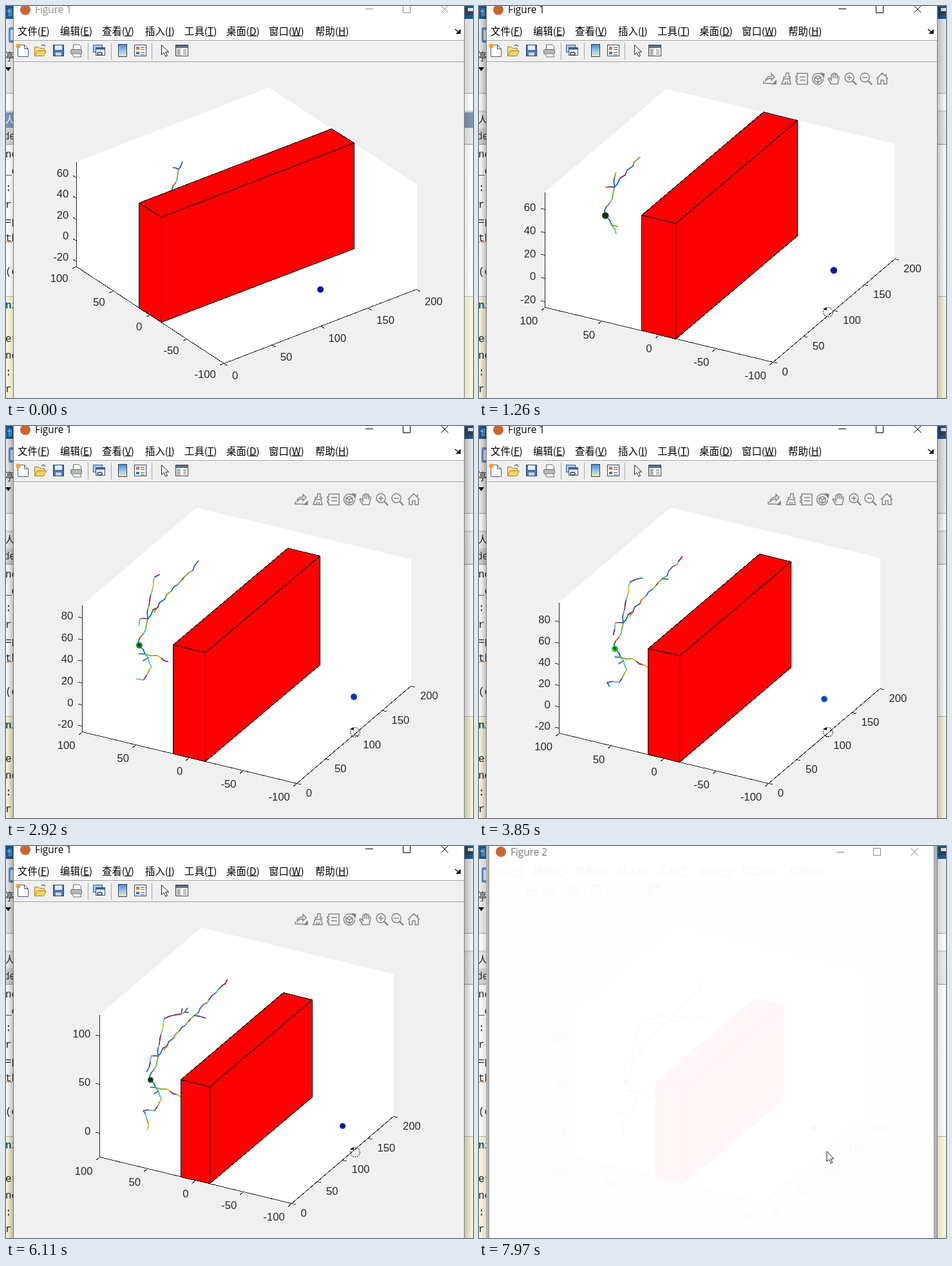
Write an HTML page that moves like this. It is 725 by 608 pixels and loops after 8 s.

```html
<!DOCTYPE html>
<html lang="zh">
<head>
<meta charset="utf-8">
<title>Path search</title>
<style>
html, body { margin: 0; width: 100%; height: 100%; overflow: hidden; background: #f0f0f0; }
svg { display: block; width: 725px; height: 608px; }
.ui { font: 15.4px "Noto Sans CJK SC", "Noto Sans CJK", "Noto Sans", sans-serif; }
.title { font: 15.4px "Open Sans", "Noto Sans", sans-serif; }
.code { font: 16px "Liberation Mono", monospace; fill: #222; }
.bold { font-weight: 700; fill: #165a6a; }
.axis { font: 16.67px "Liberation Sans", Arial, sans-serif; fill: #262626; }
.crisp { shape-rendering: crispEdges; }
</style>
</head>
<body>
<svg id="stage" viewBox="0 0 725 608" xmlns="http://www.w3.org/2000/svg">
  <defs>
    <linearGradient id="shadeL"><stop stop-color="#000" stop-opacity="0"/><stop offset="1" stop-color="#000" stop-opacity=".24"/></linearGradient>
    <linearGradient id="shadeR"><stop stop-color="#000" stop-opacity=".24"/><stop offset="1" stop-color="#000" stop-opacity="0"/></linearGradient>
    <linearGradient id="bar" x2="0" y2="1"><stop stop-color="#4d86c8"/><stop offset=".6" stop-color="#9fd0ee"/><stop offset="1" stop-color="#fbe9a0"/></linearGradient>
  </defs>
  <g id="desk"></g>
  <g id="shade"><path fill="url(#shadeL)" d="M0 0h11v608H0z"/><path fill="url(#shadeR)" d="M711 0h14v608h-14z"/></g>
  <path fill="#f0f0f0" d="M11 0h700v608H11z"/>
  <path fill="#fff" d="M11 0h700v53H11z"/>
  <path stroke="#a0a0a0" d="M11 53.5h700M11 86.5h700"/>
  <path stroke="#fafafa" d="M11 54.5h700M11 87.5h700"/>
  <path stroke="#7c7c7c" d="M11.5 0v608M711.5 0v608"/>
  <circle cx="30" cy="6" r="8" fill="#c9662f"/>
  <g id="caption">
    <text class="title" x="45" y="11">Figure 1</text>
    <path fill="none" stroke="currentColor" d="M558 4.5h12M616.5 -1.5h11v12h-11zM675.5 -.5l11 11M686.5 -.5l-11 11"/>
  </g>
  <g id="menu" class="ui" fill="#000"></g>
  <path d="M697 36l5 4M705 37.5v5h-5z" stroke="#111" stroke-width="1.6" fill="#111"/>
  <g id="tools"></g>
  <g id="plot"></g>
  <g id="hover" fill="none" stroke="#858585" stroke-width="1.5"></g>
  <g id="pointer">
    <circle id="glow" cx="-3" cy="-1" r="15" fill="#fbfb6c"/>
    <circle r="7.3" fill="none" stroke="#111" stroke-width="1.1" stroke-dasharray="1.8 1.5"/>
    <path d="M-8 -5l6 -3v5z" fill="#111"/>
  </g>
  <g id="second">
    <path fill="#b4b4b4" d="M11 0h5v608h-5zM706 0h5v608h-5z"/>
    <path fill="#fff" d="M16 0h690v608H16z"/>
    <path stroke="#8f8f8f" d="M15.5 0v608M706.5 0v608"/>
    <circle cx="34" cy="9" r="8" fill="#c9662f"/>
    <text class="title" x="49" y="15" fill="#777">Figure 2</text>
    <path fill="none" stroke="#858585" d="M555 9.5h12M612.5 3.5h11v11h-11zM670.5 3.5l11 11M681.5 3.5l-11 11"/>
  </g>
  <path id="arrow" d="M540 473.5v16l3.7 -3.4 2.6 6 2.4 -1.1 -2.6 -5.8h4.6z" fill="#fff" stroke="#222"/>
</svg>
<script>
const LOOP = 8000;
const $ = id => document.getElementById(id);
const rect = (x, y, w, h, fill, more = '') => `<rect x="${x}" y="${y}" width="${w}" height="${h}" fill="${fill}" ${more}/>`;
const path = (d, more = '') => `<path d="${d}" ${more}/>`;
const clamp = v => Math.min(1, Math.max(0, v));
const mix = (a, b, p) => a + (b - a) * p;
const blendRgb = (a, b, p) => `rgb(${a.map((v, i) => Math.round(mix(v, b[i], p)))})`;

// Linear interpolation over [time, value] pairs.
function track(t, keys) {
  let v = keys[0][1];
  for (let i = 1; i < keys.length; i++) {
    const [t0] = keys[i - 1], [t1, b] = keys[i];
    v = mix(v, b, clamp((t - t0) / (t1 - t0)));
  }
  return v;
}

function buildDesk() {
  const strip = (y, h, fill, id = '') => rect(0, y, 725, h, fill, id && `id="${id}"`);
  const code = 'nc _c :( r: =p th . (o . ni . er nc :( r:'.split(' ');
  $('desk').innerHTML =
    strip(0, 608, '#fff') + strip(0, 20, '#145c9c') + strip(20, 116, '#ececec') + strip(135, 1, '#a6a6a6') +
    strip(162, 3, '#dcdcdc') + strip(165, 24, '#7c96b4', 'tab') + strip(189, 25, '#ececec') +
    rect(0, 190, 12, 24, '#d6d6d6') +
    strip(214, 1, '#9a9a9a') + strip(451, 157, '#fcfadc') + strip(450, 1, '#b8b8b8') +
    rect(4, 33, 12, 24, '#5f93c6', 'rx="3"') + rect(7, 37, 8, 16, '#d9e9f7') +
    rect(714, 2, 14, 12, '#39424d') + rect(717, 3, 8, 5, '#dfe6ee') +
    path('M2 8h5M5 4v12M8 4v12', 'stroke="#d6e7f5" fill="none"') +
    '<text class="ui" x="-4" y="84" fill="#222">停</text>' + path('M-1 95h9l-4.5 6z') +
    '<text id="tabText" class="ui" x="-2" y="182">人</text><text class="title" x="-4" y="207" fill="#333">de</text>' +
    code.map((s, i) => s === '.' ? '' :
      `<text class="code${s === 'ni' ? ' bold' : ''}" x="-1" y="${235 + 26 * i}">${s}</text>`).join('') +
    path('M0 367l2 -2 2 2 2 -2 2 2 2 -2', 'stroke="#e07020" fill="none"');
}

function buildMenu() {
  const items = [['文件', 'F', 18], ['编辑', 'E', 84], ['查看', 'V', 149], ['插入', 'I', 216],
    ['工具', 'T', 277], ['桌面', 'D', 342], ['窗口', 'W', 408], ['帮助', 'H', 480]];
  $('menu').innerHTML = items.map(([s, k, x]) =>
    `<text x="${x}" y="44.5">${s}(<tspan text-decoration="underline">${k}</tspan>)</text>`).join('');
}

function buildTools() {
  const line = 'stroke="#4a5f7c" fill="#fff"';
  $('tools').innerHTML =
    path('M127.5 57v26M163.5 57v26M226.5 57v26', 'stroke="#a6a6a6"') +
    path('M18.5 60.5h10l6 6v12h-16zM28.5 60.5v6h6', line) + '<circle cx="19" cy="62" r="3.5" fill="#f0a030"/>' +
    path('M44.5 77.5v-14h6l2 2h7v4', 'fill="#f6d98a" stroke="#a8812c"') + path('M44.5 77.5l4 -8h14l-4 8z', 'fill="#fbd35e" stroke="#a8812c"') +
    path('M55 62q4 -4 6 1', 'fill="none" stroke="#4a78b8" stroke-width="1.5"') +
    rect(73.5, 60.5, 16, 17, '#4878b8', 'stroke="#243f70"') + rect(76, 61, 11, 7, '#e6eefa') + rect(77, 72, 9, 5, '#c8d0dc') +
    path('M104.5 68v-8h9l3 3v5z', 'fill="#fff" stroke="#666"') + rect(100.5, 67.5, 17, 7, '#b9b9b9', 'rx="2" stroke="#666"') +
    path('M103 74h12l2 5h-12z', 'fill="#f8f8f8" stroke="#777"') +
    rect(135.5, 60.5, 14, 11, '#a9c8ec', 'stroke="#3d5a8c"') + rect(139.5, 64.5, 14, 12, '#dfeafa', 'stroke="#3d5a8c"') +
    path('M139.5 66h14', 'stroke="#3d5a8c" stroke-width="3"') + rect(142, 72, 7, 4, 'none', 'rx="2" stroke="#444" stroke-width="1.5"') +
    rect(174.5, 59.5, 13, 19, 'url(#bar)', 'stroke="#30435f"') +
    rect(199.5, 60.5, 18, 17, '#fff', 'stroke="#30435f"') + rect(202, 63, 5, 5, '#e0793a') + rect(202, 71, 5, 4, '#3f78c4') +
    path('M209 64.5h6M209 67.5h6M209 72.5h6M209 75.5h6', 'stroke="#555"') +
    path('M241.5 60.5v15l3.6 -3.2 2.7 6 2.6 -1.2 -2.7 -5.8h5z', 'fill="#fff" stroke="#222"') +
    rect(263.5, 60.5, 19, 17, '#fff', 'stroke="#444"') + rect(264, 61, 18, 4, '#5a6f90') + rect(264, 65, 8, 12, '#dcdcdc') +
    path('M266 68.5h4M266 71.5h4M266 74.5h4M275 68.5h5M275 71.5h5M275 74.5h5', 'stroke="#555"');
}

function buildHover() {
  const lens = (x, d) => `<circle cx="${x - 1}" cy="-2" r="7"/>` + path(`M${x + 4} 3l6 6`, 'stroke-width="2.4"') + path(d);
  $('hover').innerHTML =
    path('M-9 3v4h13M-6 3q1 -7 9 -7v-4l5 5 -5 5v-3q-5 0 -9 4z') + path('M5 8h5v-5z', 'fill="#858585"') +
    path('M19 8l3 -8h9l2 8zM22 0v-3h3l1 -6h4v6h2v3M24 8l1 -4M28 8v-4') +
    path('M43 -8.5h16v17h-16v-4h-2v-3h2v-3h-2v-3h2zM47 -3h9M47 2h9') +
    '<circle cx="75" cy="0" r="8.5" stroke-dasharray="46 7"/>' + path('M70 -2l5 -3 5 3v5l-5 3 -5 -3zM70 -2l5 2 5 -2M75 0v6') + path('M80 -9l5 1 -1 5z', 'fill="#858585"') +
    path('M96 8l-5 -8q2 -3 5 2v-8q2 -3 3 0v5 -7q2 -2 3 0v7 -6q2 -2 3 0v7 -4q3 -1 3 2l-2 10z') +
    lens(125, 'M120 -2h8M124 -6v8') + lens(149, 'M144 -2h8') +
    path('M166 0l9 -9 9 9M168 -1v9h5v-6h4v6h5v-9M181 -4v-4');
}

const COLORS = ['#0072bd', '#d95319', '#edb120', '#7e2f8e', '#77ac30', '#4dbeee', '#a2142f', '#3f63d8'];
const FORK = [12, -37];

// Main limbs as offsets from the root on the settled view; `from` is the share grown at the start.
const limbs = [
  { from: 1, end: 1, pts: [[0, 0], [1, -11], [9, -22], FORK, [1, -37]] },
  { from: .12, end: 7500, pts: [FORK, [48, -81], [68, -100], [96, -131], [124, -161]] },
  { from: 0, end: 6110, pts: [FORK, [16, -70], [22, -95], [34, -100], [59, -105]] },
  { from: 0, start: 6700, end: 7500, pts: [[59, -105], [133, -102]] },
  { from: 0, end: 3850, pts: [[0, 0], [8, 12], [25, 14], [47, 26]] },
  { from: 0, end: 7500, pts: [[8, 12], [17, 30], [6, 48], [-11, 48], [-3, 69], [-4, 85]] },
  { from: 0, end: 3850, pts: [[1, -37], [-2, -20]] },
  { from: 0, start: 1920, end: 6110, pts: [[68, -100], [85, -96]] }
];

// The tree lies in the plane x = 100.
function lift([px, py]) {
  const w = px / 1.4927;
  return [100, 100 - w, 10 + (0.3564 * w - py) / 1.5076];
}

// Splits limbs into kinked steps, each born by a quadratic ease-out, with short random twigs.
function growTree() {
  let seed = 11;
  const rand = () => (seed = seed * 16807 % 2147483647) / 2147483647;
  const steps = [];
  const add = (a, b, born) => steps.push({ a: lift(a), b: lift(b), born, color: COLORS[Math.floor(rand() * COLORS.length)] });
  for (const { from, start = 460, end, pts } of limbs) {
    const nodes = [pts[0]];
    for (let i = 1; i < pts.length; i++) {
      const [x, y] = pts[i - 1], [dx, dy] = [pts[i][0] - x, pts[i][1] - y];
      const n = Math.max(1, Math.round(Math.hypot(dx, dy) / 7));
      for (let k = 1; k <= n; k++) {
        const kink = k < n ? 3.5 : 0;
        nodes.push([x + dx * k / n + (rand() - .5) * kink, y + dy * k / n + (rand() - .5) * kink]);
      }
    }
    const last = nodes.length - 1;
    for (let i = 1; i <= last; i++) {
      const share = (i / last - from) / (1 - from);
      const born = i / last <= from ? -1 : mix(start, end, 1 - Math.sqrt(1 - share));
      add(nodes[i - 1], nodes[i], born);
      if (born > 0 && rand() < .14) {
        const [x, y] = nodes[i], turn = rand() * 2 * Math.PI;
        add([x, y], [x + 8 * Math.cos(turn), y + 8 * Math.sin(turn)], born + 900);
      }
    }
  }
  return steps;
}
const tree = growTree();

// Orthographic camera that fits the axes box into its frame.
function camera(t) {
  const az = track(t, [[500, 37.5], [860, 46.8], [1260, 62]]) * Math.PI / 180;
  const el = track(t, [[500, 30], [860, 27.7], [1260, 26.8]]) * Math.PI / 180;
  const top = track(t, [[1300, 75], [1900, 87], [2200, 87], [4000, 99.5], [4920, 110], [6100, 121.8], [6710, 121.8], [7500, 128.7]]);
  const c = Math.cos(az), n = Math.sin(az), ce = Math.cos(el), se = Math.sin(el);
  const wide = 200 * (c + n);
  const s = Math.min(543 / wide, 427.3 / (wide * se + (top + 25) * ce));
  const mid = (top - 25) / 2;
  const at = (x, y, z) => [
    373.5 + s * ((x - 100) * c - y * n),
    340.6 - s * (((x - 100) * n + y * c) * se + (z - mid) * ce)
  ];
  return { at, top, s };
}

const fix = p => p.map(v => v.toFixed(1)).join(' ');
const snap = p => p.map(v => Math.floor(v) + .5);
const unit = (a, b) => {
  const d = Math.hypot(b[0] - a[0], b[1] - a[1]);
  return [(b[0] - a[0]) / d, (b[1] - a[1]) / d];
};
const poly = (pts, more) => path('M' + pts.map(p => fix(snap(p))).join('L') + 'z', `class="crisp" ${more}`);

function axes({ at, top }) {
  const A = at(0, 100, -25), B = at(0, -100, -25), C = at(200, -100, -25);
  const outX = unit(C, B), outY = unit(A, B), outZ = unit(B, A);
  let lines = 'M' + [at(0, 100, top), A, B, C].map(p => fix(snap(p))).join('L'), labels = '';
  const tick = (p, d, text, anchor, dx, dy) => {
    lines += `M${fix(snap(p))}l${fix([d[0] * 7, d[1] * 7])}`;
    labels += `<text x="${(p[0] + d[0] * 13 + dx).toFixed(1)}" y="${(p[1] + d[1] * 13 + dy + 6).toFixed(1)}" text-anchor="${anchor}">${text}</text>`;
  };
  for (let v = 0; v <= 200; v += 50) {
    tick(at(v, -100, -25), outY, v, 'start', 1.5, 11.4);
    tick(at(0, v - 100, -25), outX, v - 100, 'end', -.7, 12.4);
  }
  const step = top < 100 ? 20 : 50;
  for (let v = Math.ceil(-25 / step) * step; v <= top; v += step) tick(at(0, 100, v), outZ, v, 'end', -1.2, -.5);
  return poly([A, B, C, at(200, -100, top), at(200, 100, top), at(0, 100, top)], 'fill="#fff"') +
    path(lines, 'class="crisp" fill="none" stroke="#262626"') + `<g class="axis">${labels}</g>`;
}

function wall({ at }) {
  const face = pts => poly(pts.map(p => at(...p)), 'fill="#f00" stroke="#000"');
  return face([[0, 15, -25], [0, -15, -25], [0, -15, 75], [0, 15, 75]]) +
    face([[0, -15, -25], [200, -15, -25], [200, -15, 75], [0, -15, 75]]) +
    face([[0, 15, 75], [0, -15, 75], [200, -15, 75], [200, 15, 75]]);
}

function ball(p, r, fill, dark) {
  const [x, y] = p.map(v => +v.toFixed(1));
  return `<circle cx="${x}" cy="${y}" r="${r}" fill="${fill}"/>` +
    path(`M${x - 3} ${y - 2}l3 -1 3 4 -3 1z`, `fill="#020a12" opacity="${dark}"`);
}

function drawPlot(t) {
  const cam = camera(t), r = (cam.s * 2.65).toFixed(1);
  const glint = Math.sin(Math.PI * t / LOOP) ** 6;
  const green = blendRgb([20, 70, 16], [22, 205, 30], glint);
  const blue = blendRgb([6, 24, 168], [28, 86, 214], glint);
  const branches = tree.filter(k => k.born <= t).map(k =>
    path(`M${fix(cam.at(...k.a))}L${fix(cam.at(...k.b))}`, `stroke="${k.color}"`)).join('');
  $('plot').innerHTML = axes(cam) +
    `<g fill="none" stroke-width="1.8" stroke-linecap="round">${branches}</g>` +
    ball(cam.at(100, 100, 10), r, green, .7) +
    wall(cam) + ball(cam.at(100, -100, 10), r, blue, .5 * clamp(t / 4000));
}

const show = (id, on) => $(id).setAttribute('visibility', on ? 'visible' : 'hidden');

function render(t) {
  const active = t >= 460, ending = t >= 7840;
  const blend = Math.floor(4 * clamp((t - 70) / 190)) / 4;
  $('tab').setAttribute('fill', blendRgb([124, 150, 180], [238, 238, 238], blend));
  $('tabText').setAttribute('fill', blend < .5 ? '#fff' : '#222');
  const ink = active && !ending ? '#000' : '#8a8a8a';
  $('caption').setAttribute('fill', ink);
  $('caption').setAttribute('color', ink);
  $('shade').setAttribute('opacity', active && !ending ? 1 : .45);

  drawPlot(t);

  show('hover', active);
  $('hover').setAttribute('transform', t < 1340 ? 'translate(451 113)' : 'translate(458 114)');
  show('pointer', t >= 500 && !ending);
  show('glow', t >= 500 && t < 1260);
  const x = track(t, [[500, 469], [860, 496], [1260, 542]]);
  $('pointer').setAttribute('transform', `translate(${x.toFixed(1)} 475)`);

  show('second', ending);
  show('arrow', ending);
  const fade = Math.floor(clamp((t - 7840) / 125) * 2) / 2;
  $('second').setAttribute('opacity', mix(.5, .97, fade));
}

buildDesk();
buildMenu();
buildTools();
buildHover();
function loop() {
  render(performance.now() % LOOP);
  requestAnimationFrame(loop);
}
loop();
</script>
</body>
</html>
```
